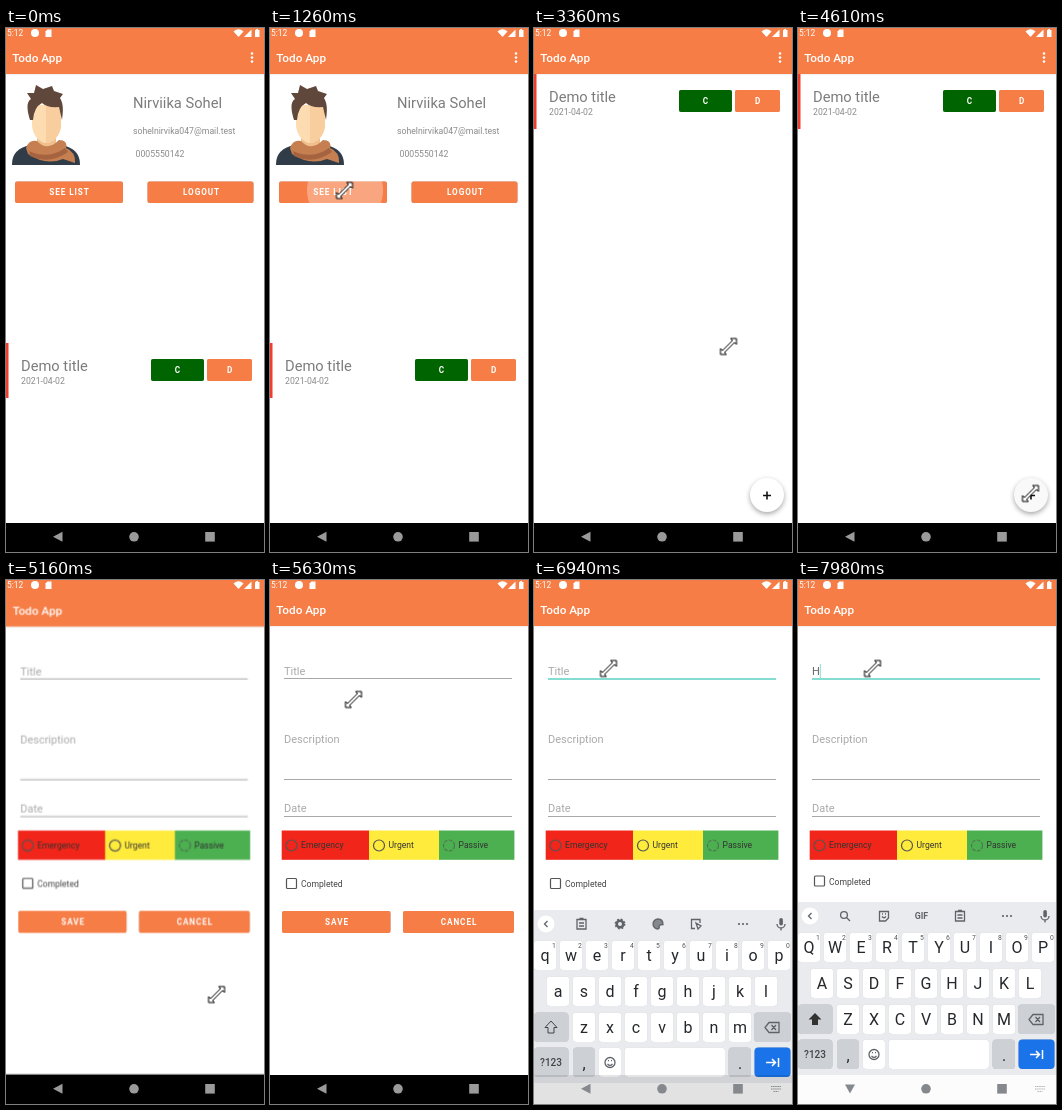
Animation, 258 px wide and 524 px high, one loop 8 s. Source, as an HTML page:

```html
<!DOCTYPE html>
<html lang="en">
<head>
<meta charset="utf-8">
<title>Todo App</title>
<style>
html, body { margin: 0; width: 100%; height: 100%; overflow: hidden; background: #fff; }
svg { display: block; width: 258px; height: 524px; }
text { font-family: Roboto, "Open Sans", sans-serif; font-size: 8.7px; fill: #8a8a8a; }
.title { font-size: 14.7px; fill: #7c7c7c; }
.hint { font-size: 11px; fill: #aaa; }
.opt { font-size: 8.6px; fill: #333; }
.btn rect { fill: #f67d45; filter: drop-shadow(0 .7px .7px rgba(0,0,0,.3)); }
.btn.done rect { fill: #006400; }
.btn text { font-size: 8.2px; font-weight: 700; letter-spacing: .9px; fill: #fff; text-anchor: middle; }
.line { stroke: #a8a8a8; }
.ring { fill: none; stroke: #555; stroke-width: 1.2; }
.key { font-size: 16px; fill: #26282b; text-anchor: middle; }
.num { font-size: 6.8px; fill: #555; text-anchor: middle; }
.icon { fill: none; stroke: #5f6368; stroke-width: 1.3; }

/* One percent of the loop is 80 ms. */
.anim { animation: 8s linear infinite; }
.hard { animation: 8s step-end infinite; }
.screen { transform-origin: 129px 262px; }
#list { animation-name: listFade, listGrow; }
#form { animation-name: formFade, formGrow; }
@keyframes listFade { 0%, 22.2% { opacity: 0 } 23.4%, 100% { opacity: 1 } }
@keyframes listGrow {
  0%, 22% { transform: scale(.83); animation-timing-function: cubic-bezier(.1,.8,.2,1) }
  28.5%, 100% { transform: none }
}
@keyframes formFade { 0%, 60.2% { opacity: 0 } 61.4%, 100% { opacity: 1 } }
@keyframes formGrow {
  0%, 60% { transform: scale(.83); animation-timing-function: cubic-bezier(.1,.8,.2,1) }
  66.5%, 100% { transform: none }
}
#tap { transform-origin: 75px 162px; animation-name: tap; }
@keyframes tap {
  0%, 13.7% { transform: scale(0); opacity: .35 }
  17.5% { transform: scale(1); opacity: .3 }
  19.6%, 100% { transform: scale(1); opacity: 0 }
}
#press { transform-origin: 233px 467px; animation-name: press; }
@keyframes press {
  0%, 53.5% { transform: scale(0); opacity: .15 }
  55.5% { transform: scale(1); opacity: .12 }
  57.6%, 100% { transform: scale(1); opacity: .02 }
}
#pointer { animation-name: move, appear; animation-timing-function: linear, step-end; }
@keyframes appear { 0% { opacity: 0 } 2.125%, 100% { opacity: 1 } }
@keyframes move {
  0%, 2.125% { transform: translate(216.5px,493.5px) }
  9.875% { transform: translate(75.5px,162.5px) }
  11.75%, 22.5% { transform: translate(74.5px,162.5px) }
  25.5%, 26.6% { transform: translate(77.5px,196.5px) }
  32.4% { transform: translate(164.5px,166.5px) }
  33.375%, 37.4% { transform: translate(165.5px,167.5px) }
  38.125% { transform: translate(185px,140px) }
  39.1% { transform: translate(207px,148px) }
  40% { transform: translate(213px,192px) }
  41% { transform: translate(206px,258px) }
  42%, 44.2% { transform: translate(194.5px,318.5px) }
  44.9% { transform: translate(222px,388px) }
  46.125%, 48.4% { transform: translate(249.5px,456.5px) }
  52%, 63.5% { transform: translate(232.5px,465.5px) }
  70.375%, 70.9% { transform: translate(83.5px,119.5px) }
  74.4%, 100% { transform: translate(74.5px,88.5px) }
}
#focus { animation-name: focus; }
@keyframes focus { 0%, 76.5% { opacity: 0 } 78.125%, 100% { opacity: 1 } }
#kbIcon { animation-name: kbIcon; }
@keyframes kbIcon { 0% { opacity: 0 } 81% { opacity: 1 } 88.625%, 100% { opacity: .6 } }
#board { animation-name: rise; }
@keyframes rise {
  0% { transform: translateY(210px); opacity: 0 }
  85% { transform: translateY(84px); opacity: .6 }
  86% { transform: translateY(34px); opacity: .8 }
  86.75% { transform: translateY(8px); opacity: 1 }
  88.625%, 100% { transform: none; opacity: 1 }
}
#navShade { animation-name: shade; }
@keyframes shade {
  0% { opacity: 1 } 85% { opacity: .28 } 86% { opacity: .2 }
  86.75% { opacity: .1 } 88.625%, 100% { opacity: 0 }
}
#nav { animation-name: navTint; }
@keyframes navTint { 0% { fill: #9a9a9a } 85%, 100% { fill: #85888c } }
#check { animation-name: squeeze; }
@keyframes squeeze { 0% { transform: none } 88.625%, 100% { transform: translateY(-2.5px) } }
.early { animation-name: early; }
.late { animation-name: late; }
@keyframes early { 0% { opacity: 1 } 88.625%, 100% { opacity: 0 } }
@keyframes late { 0% { opacity: 0 } 88.625%, 100% { opacity: 1 } }
.untyped { animation-name: untyped; }
.typed { animation-name: typed; }
@keyframes untyped { 0% { opacity: 1 } 99.75%, 100% { opacity: 0 } }
@keyframes typed { 0% { opacity: 0 } 99.75%, 100% { opacity: 1 } }
#caret { animation-name: caret; }
@keyframes caret { 0% { opacity: 0 } 89.625% { opacity: 1 } 96.375%, 100% { opacity: 0 } }
</style>
</head>
<body>
<svg viewBox="0 0 258 524">
  <defs>
    <g id="base">
      <rect x="-40" y="-60" width="340" height="700" fill="#fff"/>
      <rect x="-40" y="-60" width="340" height="106" fill="#f67d45" style="filter:drop-shadow(0 .5px .8px rgba(0,0,0,.15))"/>
      <text x="6.3" y="34" style="font-size:11.8px;font-weight:500;fill:#fff">Todo App</text>
      <rect x="-40" y="495" width="340" height="100"/>
    </g>
    <g id="dots" fill="#fff">
      <circle cx="246" cy="25.5" r="1.3"/><circle cx="246" cy="29.5" r="1.3"/><circle cx="246" cy="33.5" r="1.3"/>
    </g>
    <g id="row">
      <rect x="-40" width="42.5" height="55" fill="#f23d2c"/>
      <text class="title" x="15" y="28">Demo title</text>
      <text x="15" y="41">2021-04-02</text>
      <g class="btn done"><rect x="145" y="16" width="53" height="22" rx="2"/><text x="172" y="30">C</text></g>
      <g class="btn"><rect x="201" y="16" width="45" height="22" rx="2"/><text x="224" y="30">D</text></g>
    </g>
    <clipPath id="seeClip"><rect x="9" y="153.5" width="108" height="21.5" rx="2"/></clipPath>
  </defs>

  <g id="profile">
    <use href="#base"/><use href="#dots"/>
    <g id="avatar">
      <path d="M6 137C6 125 12 120 24 117H56C68 120 74 125 74 137Z" fill="#303c48"/>
      <path d="M31 100H50V122H31Z" fill="#f0bf8d"/>
      <path d="M20 120Q23 111 31 113Q41 124 53 112Q62 112 60 120Q70 124 69 135L57 131Q40 138 22 126Z" fill="#c67f51"/>
      <path d="M23 123Q42 132 59 120L62 124Q44 137 24 128Z" fill="#a5633f"/>
      <path d="M26 77V98C27 108 34 115 40 115C47 115 54 108 55 98V77Z" fill="#fddcb2"/>
      <path d="M40 77V115C47 115 54 108 55 98V77Z" fill="#f8ce9f"/>
      <path d="M24 92C21 82 20 74 25 71L21 65L28 65L30 57L37 61L46 58L48 63L57 66L54 70C58 76 57 85 56 92L53 79Q41 80 36 75Q28 79 27 92Z" fill="#60473c"/>
    </g>
    <text class="title" x="127" y="80">Nirviika Sohel</text>
    <text x="127" y="105.5">sohelnirvika047@mail.test</text>
    <text x="129.5" y="129">0005550142</text>
    <g class="btn"><rect x="9" y="153.5" width="108" height="21.5" rx="2"/><text x="63.5" y="167.3">SEE LIST</text></g>
    <g clip-path="url(#seeClip)"><circle id="tap" class="anim" cx="75" cy="162" r="70" fill="#fff"/></g>
    <g class="btn"><rect x="141.5" y="153.5" width="106" height="21.5" rx="2"/><text x="195.5" y="167.3">LOGOUT</text></g>
    <use href="#row" y="315"/>
  </g>

  <g id="list" class="screen anim">
    <use href="#base"/><use href="#dots"/>
    <use href="#row" y="46"/>
    <circle cx="233" cy="467" r="17" fill="#fff" style="filter:drop-shadow(0 2px 2.5px rgba(0,0,0,.35))"/>
    <circle id="press" class="anim" cx="233" cy="467" r="17"/>
    <path d="M229 467.5H237M233 463.5V471.5" stroke="#111" stroke-width="1.6"/>
  </g>

  <g id="form" class="screen anim">
    <use href="#base"/>
    <text class="hint hard untyped" x="14" y="95">Title</text>
    <text class="hint hard typed" x="14" y="94.5" style="fill:#666">H</text>
    <path class="line" d="M14 98.5H242M14 199.5H242M14 236.5H242"/>
    <path id="focus" class="anim" d="M14 99H242" stroke="#85ddd2" stroke-width="2"/>
    <path id="caret" class="hard" d="M14.5 83V98" stroke="#62d5c8"/>
    <path class="hard typed" d="M22.3 84V98" stroke="#8addd4"/>
    <text class="hint" x="14" y="163">Description</text>
    <text class="hint" x="14" y="232">Date</text>
    <rect x="11.7" y="250.5" width="87.5" height="29.3" fill="#f2251a"/>
    <rect x="99" y="250.5" width="70.5" height="29.3" fill="#ffeb3b"/>
    <rect x="169" y="250.5" width="75.4" height="29.3" fill="#4caf50"/>
    <circle class="ring" cx="21.5" cy="265.5" r="5.5"/>
    <circle class="ring" cx="109" cy="265.5" r="5.5"/>
    <circle class="ring" cx="179" cy="265.5" r="5.5" stroke-dasharray="3.5 1.5" opacity=".65"/>
    <text class="opt" x="31" y="268.4">Emergency</text>
    <text class="opt" x="118.5" y="268.4">Urgent</text>
    <text class="opt" x="188.5" y="268.4">Passive</text>
    <g id="check" class="hard">
      <rect class="ring" x="16.5" y="298.5" width="10" height="10" rx="1"/>
      <text class="opt" x="31" y="307" style="fill:#444">Completed</text>
    </g>
    <g class="btn"><rect x="12" y="331" width="108.5" height="22" rx="2"/><text x="67" y="345.3">SAVE</text></g>
    <g class="btn"><rect x="133" y="331" width="111" height="22" rx="2"/><text x="189" y="345.3">CANCEL</text></g>
  </g>

  <g id="board" class="hard">
    <rect y="322" width="258" height="173" fill="#e9ebee"/>
    <rect y="495" width="258" height="29" fill="#fcfcfc"/>
    <circle cx="12" cy="336" r="8.5" fill="#fff"/>
    <path class="icon" d="M13.5 333L10.5 336L13.5 339"/>
    <g fill="#5f6368"><circle cx="205" cy="336" r="1.1"/><circle cx="209" cy="336" r="1.1"/><circle cx="213" cy="336" r="1.1"/>
      <rect x="245.3" y="330" width="3.6" height="7.5" rx="1.8"/></g>
    <path class="icon" d="M243 336A4 4 0 0 0 251 336M247 340V342.5"/>
    <g class="icon hard early">
      <path d="M43 331.5H52V341H43ZM45.5 330.5H49.5M45 335H50M45 338H50"/>
      <circle cx="86" cy="336" r="3.3" stroke-width="2.6"/><circle cx="86" cy="336" r="4.8" stroke-dasharray="1.9"/>
      <path d="M124 331A5 5 0 1 0 124 341Q126 340 125 338Q126 336.5 129 336.5Q129 331 124 331Z" fill="#85888c"/>
      <path d="M166 335V331.5H157.5V340.5H161M162 335L167 338L164 341Z"/>
    </g>
    <g class="icon hard late">
      <circle cx="46" cy="335" r="3.4"/><path d="M48.5 337.5L52 341"/>
      <path d="M81.5 331.5H90.5V338L87.5 341H81.5ZM84 336.5Q86 339 88 336.5M84 334H85M87 334H88"/>
      <path d="M157.5 331.5H166.5V341H157.5ZM160 330.5H164M159.5 335H164.5M159.5 338H164.5"/>
      <text x="123.5" y="339" text-anchor="middle" stroke="none" style="font-size:8.8px;font-weight:700;fill:#5f6368">GIF</text>
    </g>
    <g id="keys"></g>
    <path class="hard untyped" d="M17 433L23 439.5H20V445H14V439.5H11Z" fill="none" stroke="#444"/>
    <path class="hard typed" d="M17 433L23.5 439.5H20V445H14V439.5H10.5Z" fill="#333"/>
    <path d="M235 434.5H245V444.5H235L231 439.5ZM237.5 437L242 442M242 437L237.5 442" class="icon"/>
    <text x="17" y="478" text-anchor="middle" style="font-size:10px;font-weight:500;fill:#444">?123</text>
    <text class="key" x="50" y="480.5">,</text><text class="key" x="206" y="480.5">.</text>
    <g class="icon"><circle cx="76" cy="474.5" r="5"/><path d="M73.5 475.8Q76 479 78.5 475.8M74 472.7H75M77 472.7H78"/></g>
    <path d="M232 474.5H241M238 471L241.5 474.5L238 478M244.5 470V479" fill="none" stroke="#fff" stroke-width="1.5"/>
  </g>

  <rect id="navShade" class="hard" y="495" width="258" height="29"/>
  <g id="nav" class="hard">
    <path class="hard early" d="M56.5 503.8V513.8L47 508.8Z"/>
    <path class="hard late" d="M47 504.5H57L52 513.5Z"/>
    <circle cx="128" cy="508.8" r="4.8"/><rect x="199.2" y="504" width="9.6" height="9.6"/>
    <path id="kbIcon" class="hard" d="M237 506.5H247M237 509H247M239.5 511.5H244.5" stroke="#85888c" stroke-width="1.2" stroke-dasharray="1.5 .6"/>
  </g>

  <g fill="#fff">
    <text x="1" y="8" style="font-size:8.4px;fill:#fff">5:12</text>
    <circle cx="29" cy="5" r="4"/>
    <path d="M41.5 1.5H45.5V9H39.5V3.5Z"/>
    <path d="M227.5 3.5Q232.5 -.8 237.5 3.5L232.5 9Z"/><path d="M238 9H245.5V1.5Z"/>
    <path d="M249 2H250.2V1H252V2H253.5V9H249Z"/>
  </g>

  <g id="pointer" class="anim">
    <path d="M8-8H2L4-6L-6 4L-8 2V8H-2L-4 6L6-4L8-2Z" fill="#fff" stroke="#000"/>
  </g>
</svg>
<script>
const keyBox = (x, y, w, fill = "#fff") =>
  `<rect x="${x}" y="${y}" width="${w}" height="29.5" rx="4" fill="${fill}" style="filter:drop-shadow(0 .7px .3px #b5b8bc)"/>`;
const glyph = (char, x, y) => `<text class="key" x="${x}" y="${y}">${char}</text>`;

const rows = [["qwertyuiop", 11, 352.5], ["asdfghjkl", 24, 388.5], ["zxcvbnm", 50, 424.5]];
let boxes = "", lower = "", upper = "";
rows.forEach(([letters, start, y], row) => {
  [...letters].forEach((char, i) => {
    const x = start + 26 * i;
    boxes += keyBox(x - 11.5, y, 23);
    lower += glyph(char, x, y + 20);
    upper += glyph(char.toUpperCase(), x, y + 20.5);
    if (row === 0) boxes += `<text class="num" x="${x + 9}" y="${y + 7}">${(i + 1) % 10}</text>`;
  });
});
const gray = "#cdd0d5", shiftY = 424.5, spaceY = 459.5;
boxes += keyBox(0, shiftY, 34.5, gray) + keyBox(220, shiftY, 37, gray)
  + keyBox(0, spaceY, 34.5, gray) + keyBox(39, spaceY, 22, gray) + keyBox(64.5, spaceY, 22.5)
  + keyBox(90.5, spaceY, 100.5) + keyBox(194.5, spaceY, 22.5, gray) + keyBox(220.5, spaceY, 36, "#1a73e8");
document.getElementById("keys").innerHTML =
  `${boxes}<g class="hard untyped">${lower}</g><g class="hard typed">${upper}</g>`;
</script>
</body>
</html>
```
